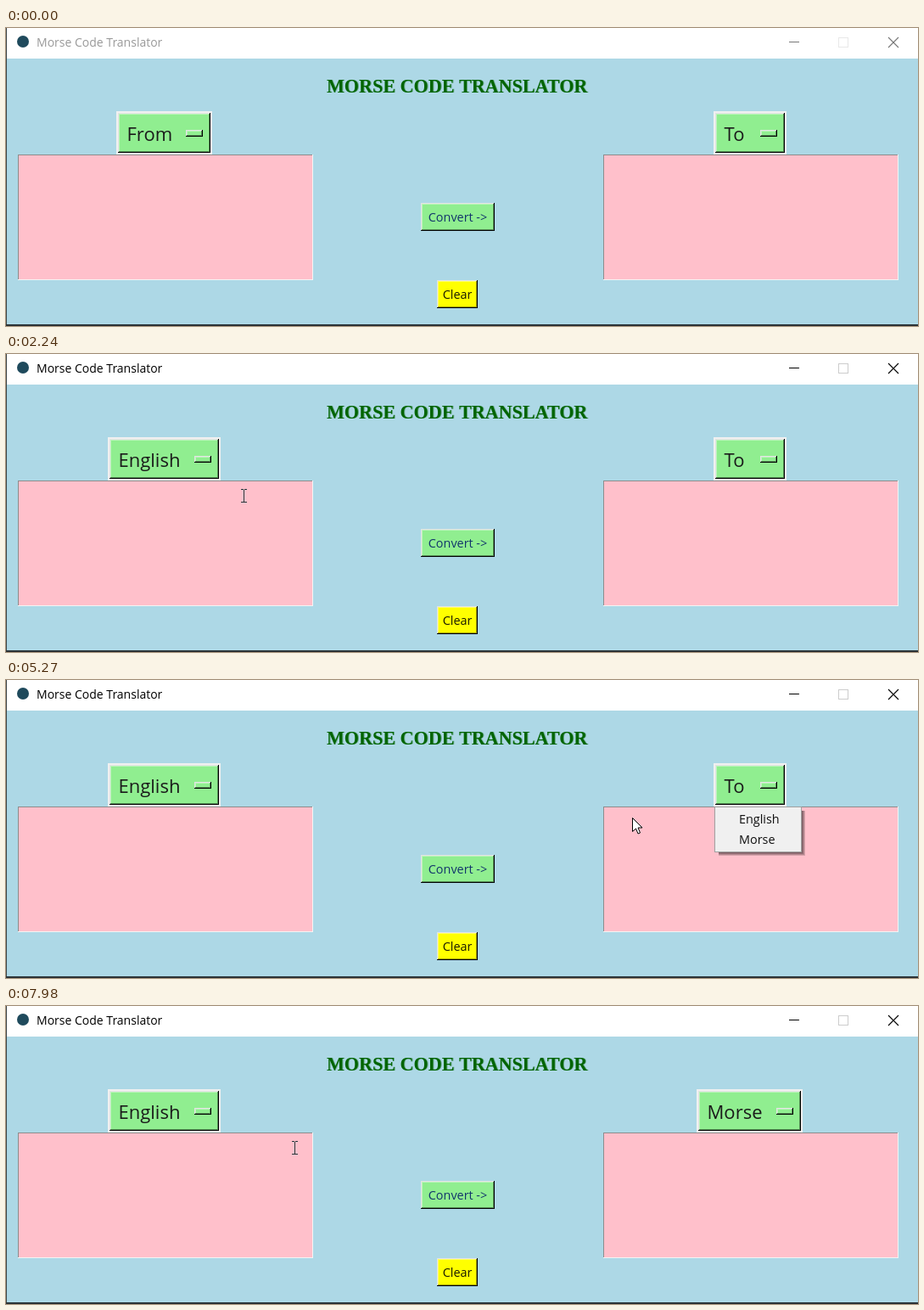
An HTML page with a canvas that plays this animation: 1075x351 px, repeating every 8 s.

```html
<!DOCTYPE html>
<html lang="en">
<head>
<meta charset="utf-8">
<title>Morse Code Translator</title>
<style>
html, body { margin: 0; width: 1075px; height: 351px; overflow: hidden; background: #add8e6; }
canvas { display: block; }
</style>
</head>
<body>
<canvas id="stage" width="1075" height="351"></canvas>
<script>
const ctx = document.getElementById('stage').getContext('2d');
const LOOP = 8000, STEP = 44;
const SANS = '"Open Sans", "Noto Sans", sans-serif';
const SERIF = '"Liberation Serif", "Noto Serif", serif';
const GREEN = '#90ee90', ORANGE = '#ffa500', PINK = '#ffc0cb', SKY = '#add8e6';

// Pointer moves and the bend of each path at its middle.
const moves = [
  { start: 50, end: 140, to: [209, 171] },
  { start: 390, end: 830, to: [168, 130], bend: [-72, 0] },
  { start: 1230, end: 1580, to: [175, 160], bend: [6, 0] },
  { start: 2010, end: 2980, to: [837, 128], bend: [0, 25] },
  { start: 3310, end: 3390, to: [843, 129] },
  { start: 3800, end: 4290, to: [862, 177] },
  { start: 5040, end: 5690, to: [849, 194], bend: [-146, -25] },
  { start: 5910, end: 5910, to: [858, 194] },
  { start: 6060, end: 6420, to: [862, 192], bend: [-12, 4] },
  { start: 7720, end: 7980, to: [340, 167], bend: [0, -74] }
];
moves.forEach((m, i) => m.from = i ? moves[i - 1].to : [1080, 318]);

const clicks = [[1030, 1180], [1810, 2010], [3570, 3700], [4670, 5040], [5690, 5910], [6190, 6320]];

const within = (t, a, b) => t >= a && t < b;
const inBox = (p, x, y, w, h) => p && p[0] >= x && p[0] < x + w && p[1] >= y && p[1] < y + h;

function pointerAt(t) {
  const move = moves.filter(m => m.start <= t).pop();
  if (!move) return null;
  const { start, end, from, to, bend = [0, 0] } = move;
  const gaps = Math.round((end - start) / STEP);
  const done = t >= end ? gaps : Math.floor((t - start) / (end - start) * gaps);
  const p = (1 - Math.cos(Math.PI * (done + 1) / (gaps + 1))) / 2;
  return from.map((v, i) => Math.round(v + (to[i] - v) * p + bend[i] * Math.sin(Math.PI * p)));
}

function rect(x, y, w, h, color) {
  ctx.fillStyle = color;
  ctx.fillRect(x, y, w, h);
}

function text(str, x, y, size, color, weight = 500, family = SANS) {
  ctx.font = `${weight} ${size}px ${family}`;
  ctx.fillStyle = color;
  ctx.fillText(str, x, y);
}

function line(color, x1, y1, x2, y2) {
  ctx.strokeStyle = color;
  ctx.lineWidth = 1.1;
  ctx.beginPath();
  ctx.moveTo(x1, y1);
  ctx.lineTo(x2, y2);
  ctx.stroke();
}

function disc(x, y, r, color) {
  ctx.fillStyle = color;
  ctx.beginPath();
  ctx.arc(x, y, r, 0, 7);
  ctx.fill();
}

// Two-pixel bevel: light at the top left, dark at the bottom right.
function raised(x, y, w, h, face) {
  rect(x, y, w, h, '#000');
  rect(x, y, w - 1, h - 1, '#e3e3e3');
  rect(x + 1, y + 1, w - 2, h - 2, face);
  rect(x + 1, y + 1, w - 2, h - 2, 'rgba(0,0,0,.4)');
  rect(x + 1, y + 1, w - 3, h - 3, face);
  rect(x + 1, y + 1, w - 3, h - 3, 'rgba(255,255,255,.4)');
  rect(x + 2, y + 2, w - 4, h - 4, face);
}

function titleBar(active) {
  const ink = active ? '#000' : '#777';
  rect(0, 0, 1075, 36, '#fff');
  disc(20, 16, 7, '#1f4a5c');
  text('Morse Code Translator', 36, 22, 14, active ? '#000' : '#999', 400);
  rect(923, 16, 12, 1, ink);
  ctx.strokeStyle = active ? '#ccc' : '#e8e8e8';
  ctx.lineWidth = 1;
  ctx.strokeRect(981.5, 11.5, 11, 11);
  line(ink, 1040, 11, 1052, 23);
  line(ink, 1052, 11, 1040, 23);
}

function heading() {
  const str = 'MORSE CODE TRANSLATOR';
  text(str, 379, 76, 22.1, 'rgba(0,100,0,.4)', 'bold', SERIF);
  text(str, 378, 75.5, 22.1, '#006400', 'bold', SERIF);
}

function textBox(x) {
  rect(x, 149, 348, 148, '#f4f4f4');
  rect(x, 149, 347, 147, '#8c8c8c');
  rect(x + 1, 150, 346, 146, PINK);
}

function picker(center, w, label, hot) {
  const x = Math.floor(center - w / 2);
  const face = hot ? ORANGE : GREEN;
  rect(x, 98, w, 51, '#f0f0f0');
  raised(x + 2, 100, w - 4, 47, face);
  text(label, x + 12.5, 132.5, 22, '#1a1a1a');
  raised(x + w - 31, 120, 20, 8, face);
}

function button(x, y, w, label, face, ink) {
  raised(x, y, w, 33, face);
  ctx.textAlign = 'center';
  text(label, x + w / 2, y + 22, 14.4, ink);
  ctx.textAlign = 'left';
}

function menu(x, p) {
  for (let i = 1; i < 5; i++) rect(x + 5, 154, 98 + i, 49 + i, 'rgba(0,0,0,.16)');
  rect(x, 149, 103, 54, '#a0a0a0');
  rect(x + 1, 150, 101, 52, '#f0f0f0');
  ['English', 'Morse'].forEach((label, i) => {
    const y = 151 + i * 24;
    const hot = inBox(p, x, y, 103, 24);
    if (hot) rect(x + 3, y, 96, 24, '#0078d7');
    text(label, x + 29, y + 18, 14.4, hot ? '#fff' : '#111', 400);
  });
}

function arrow(x, y) {
  const tip = new Path2D(`M${x + .5} ${y + .5}v16l4-3.5 2.5 6 2.5-1-2.5-6h5z`);
  ctx.fillStyle = '#fff';
  ctx.fill(tip);
  ctx.strokeStyle = '#000';
  ctx.lineWidth = 1;
  ctx.stroke(tip);
}

function iBeam(x, y) {
  const ink = '#26383c';
  rect(x, y - 7, 1, 15, ink);
  for (const dy of [-8, 7]) {
    rect(x - 3, y + dy, 3, 1, ink);
    rect(x + 1, y + dy, 3, 1, ink);
  }
}

function draw(t) {
  const p = pointerAt(t);
  const fromMenu = within(t, 1180, 2010);
  const toMenu = within(t, 3700, 6060);
  const fromHot = fromMenu || inBox(p, 130, 98, 113, 51);
  const toHot = inBox(p, 834, 98, 86, 51);

  rect(0, 0, 1075, 351, SKY);
  titleBar(t >= 1080);
  rect(0, 0, 1, 351, '#3c4548');
  rect(0, 349, 1075, 2, '#2b3236');
  heading();

  textBox(14);
  textBox(704);
  if (within(t, 6200, 7800)) rect(705, 151, 2, 29, '#000');

  if (t < 2010) picker(187, 113, 'From', fromHot);
  else picker(187, 133, 'English', false);
  if (t < 6060) picker(877, 86, 'To', toHot);
  else picker(877, 125, 'Morse', false);

  button(489, 206, 87, 'Convert ->', GREEN, '#12356b');
  button(508, 297, 48, 'Clear', '#ffff00', '#1a1a00');

  if (fromMenu) menu(131, p);
  if (toMenu) menu(835, p);
  if (!p) return;

  if (clicks.some(([a, b]) => within(t, a, b))) disc(...p, 15, 'rgba(255,255,0,.5)');
  const overText = !fromMenu && !toMenu && [14, 704].some(x => inBox(p, x, 149, 348, 148));
  (overText ? iBeam : arrow)(...p);
}

function tick() {
  draw(performance.now() % LOOP);
  requestAnimationFrame(tick);
}
tick();
</script>
</body>
</html>
```
